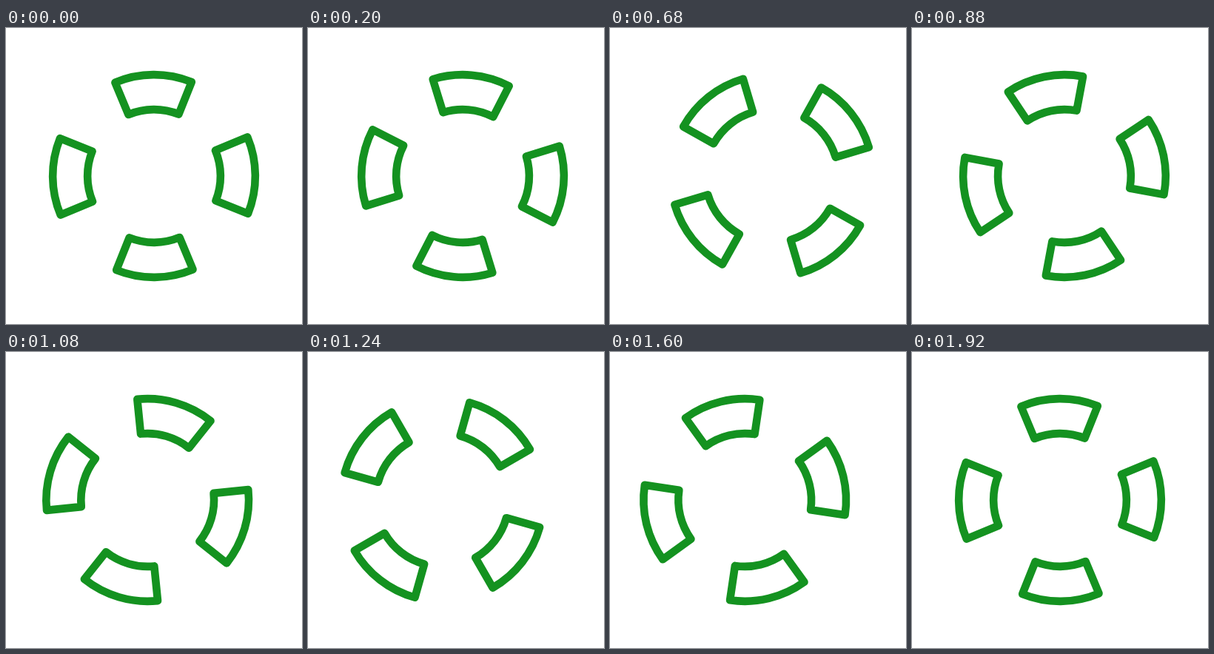
Write an HTML page that moves like this. It is 400 by 400 pixels and loops after 2000 ms.

```html
<!DOCTYPE html>
<html lang="en">
<head>
<meta charset="utf-8">
<title>Rolling ring</title>
<style>
  html, body { margin: 0; width: 100%; height: 100%; overflow: hidden; background: #fff; }
  svg { display: block; width: 100vw; height: 100vh; }
</style>
</head>
<body>
<svg viewBox="0 0 400 400">
  <defs>
    <path id="segment" d="M-51.7 -126.7A136.8 136.8 0 0 1 51.7 -126.7L34 -83.2A89.9 89.9 0 0 0 -34 -83.2Z"/>
  </defs>
  <g id="ring" transform="translate(200 200) rotate(-0.4)" fill="none" stroke="#149220" stroke-width="10.6" stroke-linejoin="round">
    <use href="#segment"/>
    <use href="#segment" transform="rotate(90)"/>
    <use href="#segment" transform="rotate(180)"/>
    <use href="#segment" transform="rotate(270)"/>
  </g>
</svg>
<script>
  const LOOP = 2000, STEP = 40, MOVE = 1920;
  const SWING = 24, TURN = 180, TILT = -0.4;
  const ring = document.getElementById('ring');

  // Eased progress from 0 to 1 between two times
  function ease(t, from, to) {
    const u = Math.min(1, Math.max(0, (t - from) / (to - from)));
    return u * u * (3 - 2 * u);
  }

  function draw(now) {
    const t = Math.floor((now % LOOP) / STEP) * STEP;
    // Right, across to the left, then back to the centre
    const x = 200 + SWING * (ease(t, 0, 480) - 2 * ease(t, 480, 1440) + ease(t, 1440, MOVE));
    const angle = TILT + TURN * ease(t, 0, MOVE);
    ring.setAttribute('transform', `translate(${x} 200) rotate(${angle})`);
  }

  let start;
  function tick(now) {
    start ??= now;
    draw(now - start);
    requestAnimationFrame(tick);
  }
  requestAnimationFrame(tick);
</script>
</body>
</html>
```
